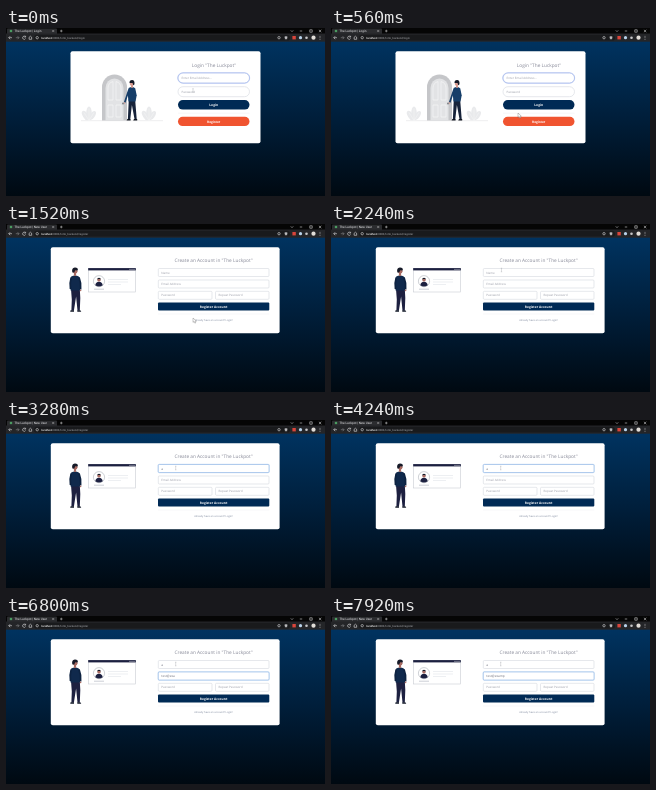
These frames come from a looping animation (319x168 px, 8000 ms). An HTML page:

```html
<!DOCTYPE html>
<html lang="en">
<head>
<meta charset="utf-8">
<title>Sign up</title>
<style>
  html, body { margin: 0; width: 100%; height: 100%; overflow: hidden; background: #000; }
  svg { display: block; width: 100%; height: 100%; }
  text { font-family: "Open Sans", "Noto Sans", sans-serif; text-rendering: geometricPrecision; }
  .bar text { font-family: Roboto, "Noto Sans", sans-serif; }
  .title { font-size: 4.75px; fill: #858796; text-anchor: middle; }
  .field { fill: #fff; stroke: #d5d8e0; stroke-width: .6; }
  .hint { font-size: 3px; fill: #989ba6; }
  .typed { font-size: 3.2px; fill: #6e707e; }
  .label { font-size: 3.25px; font-weight: 700; fill: #fff; text-anchor: middle; }
  .link { font-size: 2.6px; fill: #7d879c; text-anchor: middle; }
</style>
</head>
<body>
<svg id="stage" viewBox="0 0 319 168" preserveAspectRatio="none">
  <defs>
    <linearGradient id="sky" x1="0" y1="0" x2="0" y2="1">
      <stop offset="0" stop-color="#003360"/>
      <stop offset=".5" stop-color="#001e3a"/>
      <stop offset="1" stop-color="#000911"/>
    </linearGradient>
    <g id="plant" fill="#e9eaec">
      <ellipse cx="-3.6" cy="-5" rx="2.6" ry="5.2" transform="rotate(-32 -3.6 -5)"/>
      <ellipse cx="3.4" cy="-5" rx="2.5" ry="5" transform="rotate(34 3.4 -5)"/>
      <ellipse cx="0" cy="-7" rx="2.8" ry="7"/>
      <path d="M0 0V-12M0 0L-5-8M0 0L5-8" fill="none" stroke="#fff" stroke-width=".3"/>
    </g>
  </defs>

  <rect y="13" width="319" height="155" fill="url(#sky)"/>

  <g class="bar">
    <rect width="319" height="6" fill="#050505"/>
    <path d="M1 6V1.4Q1 .5 2 .5H50Q51 .5 51 1.4V6Z" fill="#2b2c2f"/>
    <rect y="5.5" width="319" height="8.2" fill="#242528"/>
    <circle cx="5" cy="3" r="1.3" fill="#4b9c61"/>
    <text id="tab" x="8.5" y="4" font-size="3.1" fill="#f4f4f6"></text>
    <path d="M46.4 2.2l1.6 1.6m0-1.6l-1.6 1.6M54 3h2.6m-1.3-1.3v2.6" stroke="#ddd" stroke-width=".5"/>
    <g fill="none" stroke="#e0e0e2" stroke-width=".55">
      <path d="M284.8 2.4l1.2 1.2 1.2-1.2M293.8 3h2.4M303.8 1.8h2.4v2.4h-2.4zM312.9 1.8l2.4 2.4m0-2.4l-2.4 2.4"/>
    </g>
    <rect x="28" y="6.8" width="256" height="5.8" rx="2.9" fill="#191a1c"/>
    <g fill="none" stroke="#dcdcde" stroke-width=".6">
      <path d="M6 9.7H2.8M4.2 8.2L2.7 9.7l1.5 1.5"/>
      <path d="M9.8 9.7h3.2M11.6 8.2l1.5 1.5-1.5 1.5" stroke="#85868a"/>
      <path d="M19.4 8.7a1.6 1.6 0 1 0 .2 1.8M19.6 7.8v1.3h-1.3"/>
      <path d="M22.7 9.8l1.7-1.6 1.7 1.6M23.2 9.5v1.8h2.4V9.5"/>
      <circle cx="31.2" cy="9.7" r="1.2"/>
      <circle cx="273" cy="9.7" r="1.2"/>
      <path d="M278.6 9.2h2.8l-2.2 1.9.8-3 .9 3Z"/>
    </g>
    <text x="35.2" y="10.7" font-size="2.75" fill="#a9aaae"><tspan fill="#fff" font-weight="500">localhost</tspan>:8080/lotto_backend/<tspan id="path"></tspan></text>
    <rect x="286.4" y="8" width="3.4" height="3.4" fill="#d9453b"/>
    <circle cx="294.5" cy="9.7" r="1.6" fill="#b9d2ea"/>
    <circle cx="300.5" cy="9.7" r="1.3" fill="#c8c8ca"/>
    <circle cx="307.5" cy="9.7" r="2.1" fill="#e1ddd8"/>
    <g fill="#dcdcde"><circle cx="314" cy="8.2" r=".45"/><circle cx="314" cy="9.7" r=".45"/><circle cx="314" cy="11.2" r=".45"/></g>
  </g>

  <g id="login">
    <rect x="64.5" y="23.2" width="190" height="92" rx="2" fill="#fff"/>
    <path d="M75 92.7h82" stroke="#d4d5d8" stroke-width=".4"/>
    <use href="#plant" x="83" y="92.5"/>
    <use href="#plant" x="143" y="92.5"/>
    <path d="M96 92.5V59a12.5 12.5 0 0 1 25 0V92.5Z" fill="#c5c6c9"/>
    <path d="M99.5 92.5V60a9 9.5 0 0 1 18 0V92.5Z" fill="#e2e3e5"/>
    <g fill="none" stroke="#f8f8f8" stroke-width=".6">
      <path d="M102 72V60q0-5 5-6.5V72ZM110 72V53.5q5 1.5 5 6.5V72Z"/>
      <path d="M102 77h5v12h-5zM110 77h5v12h-5z"/>
    </g>
    <circle cx="117" cy="75.5" r=".9" fill="#74777d"/>
    <path d="M122.8 71h6.3l1.6 20h-2.2l-2.6-14-1.6 14h-2.4Z" fill="#17233a"/>
    <path d="M122.6 60q3.5-2 6.6.2l1.5 7-1.2 6.2h-7l-.8-7Z" fill="#163e69"/>
    <path d="M123 61.5l-2.5 7.5-1.8 5.5" fill="none" stroke="#163e69" stroke-width="1.7"/>
    <circle cx="118.5" cy="75" r=".8" fill="#d99c91"/>
    <path d="M125 57h2v2.8h-2z" fill="#d99c91"/>
    <circle cx="125.8" cy="55.8" r="2.1" fill="#d99c91"/>
    <path d="M123.5 55q-.2-3 2.6-3.1 3 .2 2.3 4.6l-1.2.8-.6-2.2Z" fill="#151a27"/>
    <path d="M121.4 91h3.2v1.6h-4zM128 91h3.2v1.6h-4z" fill="#10151f"/>

    <text class="title" x="208" y="38.5">Login "The Luckpot"</text>
    <rect x="171.2" y="44.2" width="73" height="11.6" rx="5.8" fill="#4e73df" opacity=".25"/>
    <rect class="field" x="172" y="45" width="71.5" height="10" rx="5" style="stroke:#8ea6e6"/>
    <text class="hint" x="175.5" y="51">Enter Email Address...</text>
    <rect class="field" x="172" y="58.7" width="71.5" height="10" rx="5"/>
    <text class="hint" x="175.5" y="64.7">Password</text>
    <rect x="172" y="72" width="71.5" height="9.6" rx="4.8" fill="#002a55"/>
    <text class="label" x="207.7" y="77.9">Login</text>
    <path d="M172 85.2h71.5" stroke="#e8e9ed" stroke-width=".4"/>
    <rect id="join" x="172" y="88.8" width="71.5" height="9.2" rx="4.6"/>
    <text class="label" x="207.7" y="94.5">Register</text>
  </g>

  <g id="register">
    <rect x="44.8" y="23.2" width="228.8" height="86" rx="2" fill="#fff"/>
    <path d="M65 65h8.8l.5 9-.5 12.5h-2.3l-1.4-14-2.2 14h-2.5l.4-11Z" fill="#1d2040"/>
    <path d="M65.2 52.6q3.6-2.2 7.6-.2l1.8 6.6-.6 7.4H64.6l-.5-7Z" fill="#10294c"/>
    <path d="M65.2 53.6q-1.6 5-.7 11.4M73 53.4q2.2 5.4 1.6 12" fill="none" stroke="#0d2240" stroke-width="1.7"/>
    <circle cx="74.6" cy="66.4" r=".8" fill="#a86b63"/>
    <path d="M67.9 48.5h2.2v3.4h-2.2z" fill="#a86b63"/>
    <circle cx="69.2" cy="47.2" r="2.3" fill="#a86b63"/>
    <path d="M66.4 48.4q-1.2-4.6 2.4-5 3.6-.1 3 3.2l-2.6-.4-.9 2.4Z" fill="#161a28"/>
    <path d="M64.6 86.2h3.4v1.6h-3.8zM71.3 86.2h3l1 1.6h-4z" fill="#111726"/>

    <rect x="82.5" y="44.5" width="47" height="23.5" fill="#fff" stroke="#c9ccd3" stroke-width=".6"/>
    <rect x="82.2" y="44.1" width="47.6" height="2.3" fill="#1c2040"/>
    <g fill="#fff"><circle cx="124" cy="45.3" r=".5"/><circle cx="126" cy="45.3" r=".5"/><circle cx="128" cy="45.3" r=".5"/></g>
    <circle cx="93" cy="57.2" r="5.6" fill="#fff" stroke="#858b96" stroke-width=".4"/>
    <path d="M89.3 61.2q.4-3.5 3.7-3.5t3.7 3.5q-3.7 2.7-7.4 0Z" fill="#1c2040"/>
    <circle cx="93" cy="55.9" r="1.7" fill="#a86b63"/>
    <path d="M91.2 56q-.2-2.2 1.8-2.3 2 .1 1.8 2.3l-.7-1h-2.2Z" fill="#161a28"/>
    <path d="M102 55.5h20M102 58h20M102 60.5h13" stroke="#e6e8ec" stroke-width=".7"/>
    <path d="M88 65.2h10" stroke="#a9afba" stroke-width=".6"/>

    <text class="title" x="207.6" y="38.2">Create an Account in "The Luckpot"</text>
    <g id="form"></g>
    <rect x="152" y="78.4" width="111.3" height="8" rx="1" fill="#002a55"/>
    <text class="label" x="207.6" y="83.5">Register Account</text>
    <path d="M152 90h111.3" stroke="#e8e9ed" stroke-width=".4"/>
    <text class="link" x="207.6" y="97">Already have an account? Login!</text>
  </g>

  <g id="status" class="bar">
    <path d="M0 163.4H47q1 0 1 1V168H0Z" fill="#2b2c2f"/>
    <text x="1" y="166.9" font-size="2.65" fill="#c9cacd">localhost:8080/lotto_backend/register</text>
  </g>

  <g id="mouse">
    <path id="beam" d="M-.7-1.8H.7M0-1.8V1.8M-.7 1.8H.7" fill="none" stroke="#9a9ca2" stroke-width=".35"/>
    <path id="hand" d="M-.6 0q.6-.8 1.2 0V2l2.2.6V5L2 6.3H-.6L-2.2 3.6l.8-.4.8.8Z" fill="#fff" stroke="#222" stroke-width=".35"/>
    <path id="arrow" d="M0 0V4.4l1.1-1 .8 1.8.8-.4L2 3.1h1.4Z" fill="#fff" stroke="#444" stroke-width=".3"/>
  </g>
</svg>
<script>
const LOOP = 8000, SWITCH = 1520, FADE = 150;
const NAME_FOCUS = 2640, EMAIL_FOCUS = 4480;
const NAME = "a", NAME_KEYS = [3200];
const MAIL = "test@examp";
const MAIL_KEYS = [4640, 4800, 4960, 5120, 6240, 6560, 6720, 6800, 7120, 7920];
// time, x, y of the pointer
const ROUTE = [[0, 187, 62.5], [120, 187, 62.5], [800, 187, 94], [1840, 187, 94],
               [2240, 170.5, 46], [2400, 169.7, 48], [8000, 169.7, 48]];

const $ = id => document.getElementById(id);
const clamp = v => Math.max(0, Math.min(1, v));
const ramp = (t, start, span = FADE) => clamp((t - start) / span);
const show = (el, on) => el.setAttribute("visibility", on ? "inherit" : "hidden");
const typed = (text, keys, t) => text.slice(0, keys.filter(k => k <= t).length);
const mix = (a, b, k) => `rgb(${a.map((v, i) => Math.round(v + (b[i] - v) * k))})`;

function add(parent, tag, attrs, text = "") {
  const el = document.createElementNS("http://www.w3.org/2000/svg", tag);
  for (const key in attrs) el.setAttribute(key, attrs[key]);
  el.textContent = text;
  return parent.appendChild(el);
}

function makeField(x, y, width, hint) {
  const form = $("form"), height = 8;
  const glow = add(form, "rect", { x: x - .7, y: y - .7, width: width + 1.4, height: height + 1.4, rx: 1.6, fill: "#5a9be0" });
  const box = add(form, "rect", { class: "field", x, y, width, height, rx: 1 });
  const label = add(form, "text", { class: "hint", x: x + 3, y: y + 5 }, hint);
  const value = add(form, "text", { class: "typed", x: x + 3, y: y + 5 });
  return (text, focus) => {
    glow.setAttribute("opacity", .25 * focus);
    box.style.stroke = mix([213, 216, 224], [138, 178, 228], focus);
    value.textContent = text;
    show(label, !text);
  };
}

const setName = makeField(152.3, 44.5, 110.7, "Name");
const setMail = makeField(152.3, 56, 110.7, "Email Address");
makeField(152.3, 67.3, 53.7, "Password")("", 0);
makeField(209.5, 67.3, 53.5, "Repeat Password")("", 0);

function pointer(t) {
  const i = ROUTE.findIndex((p, n) => n && t <= p[0]);
  const [t0, x0, y0] = ROUTE[i - 1], [t1, x1, y1] = ROUTE[i];
  const u = ramp(t, t0, t1 - t0), k = u * u * (3 - 2 * u);
  return [x0 + (x1 - x0) * k, y0 + (y1 - y0) * k];
}

function render(t) {
  const first = t < SWITCH;
  const [x, y] = pointer(t);
  show($("login"), first);
  show($("register"), !first);
  $("tab").textContent = first ? "The Luckpot | Login" : "The Luckpot | New User";
  $("path").textContent = first ? "login" : "register";

  const hover = first && y > 88.8;
  $("join").setAttribute("fill", mix([240, 84, 48], [222, 34, 8], first ? ramp(t, 660) : 0));
  show($("status"), hover);

  const overField = first ? y < 68.7 : y < 53;
  $("mouse").setAttribute("transform", `translate(${x} ${y})`);
  show($("beam"), overField);
  show($("hand"), hover);
  show($("arrow"), !overField && !hover);

  const moved = ramp(t, EMAIL_FOCUS);
  setName(typed(NAME, NAME_KEYS, t), ramp(t, NAME_FOCUS) * (1 - moved));
  setMail(typed(MAIL, MAIL_KEYS, t), moved);
}

const start = performance.now();
function tick() {
  render((performance.now() - start) % LOOP);
  requestAnimationFrame(tick);
}
tick();
</script>
</body>
</html>
```
